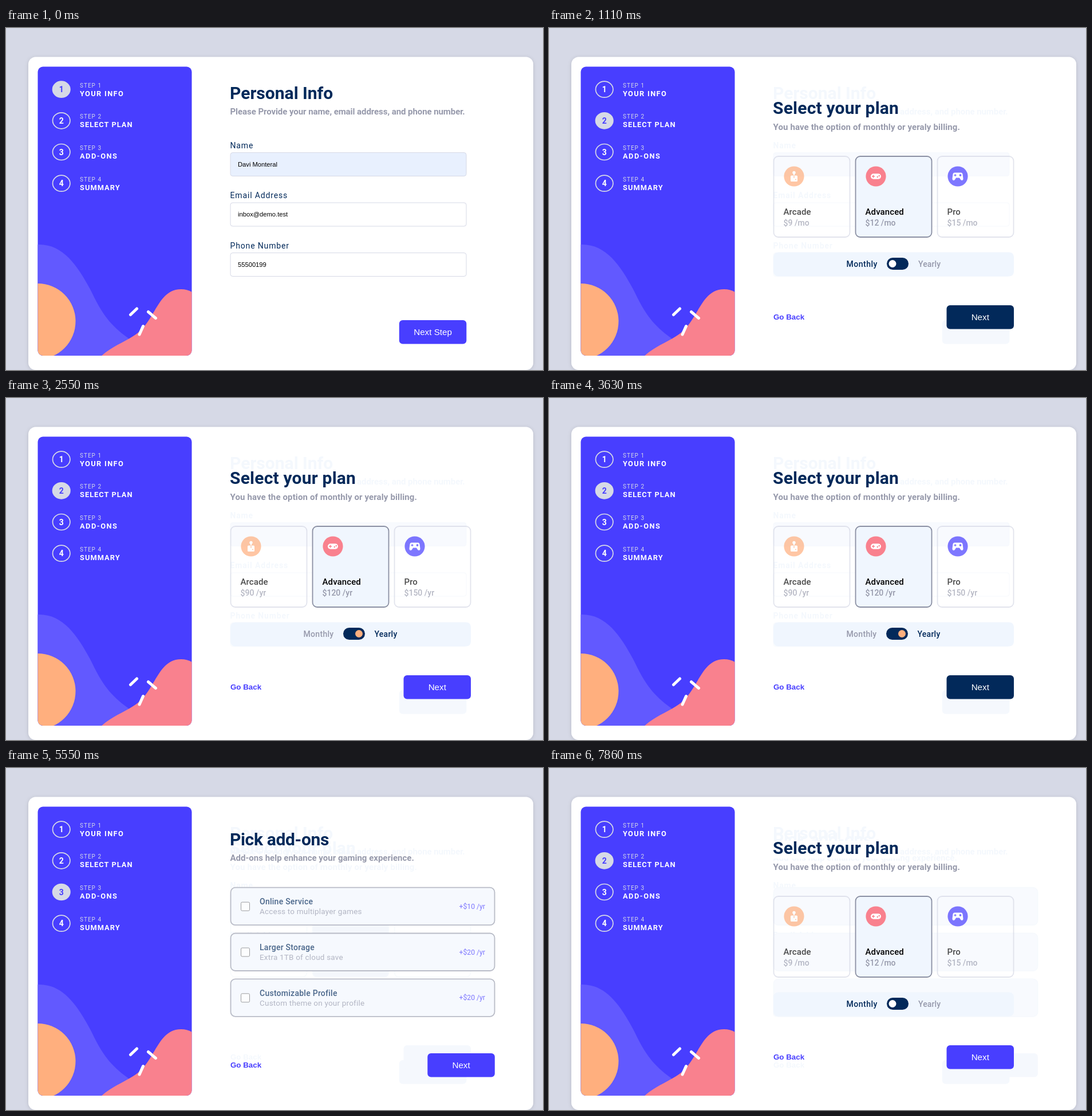
These frames come from a looping animation (938x597 px, 8 s). An HTML page:

```html
<!DOCTYPE html>
<html lang="en">
<head>
<meta charset="utf-8">
<title>Sign-up steps</title>
<style>
html, body { margin: 0; width: 100%; height: 100%; overflow: hidden; background: #d6d9e6; }
svg { display: block; width: 938px; height: 597px; }
text { font-family: Roboto, "Open Sans", sans-serif; white-space: pre; }
.title { font-size: 30px; font-weight: 700; fill: #02295a; }
.sub { font-size: 15px; font-weight: 700; fill: #9699ab; }
.label { font-size: 14px; letter-spacing: .85px; fill: #02295a; }
.input { font: 11.2px "Liberation Sans", Arial, sans-serif; fill: #000; }
.cta { font: 15.2px "Liberation Sans", Arial, sans-serif; fill: #fff; text-anchor: middle; }
.back { font: 700 13.33px "Liberation Sans", Arial, sans-serif; }
.step { font-size: 10px; letter-spacing: 1px; fill: #d6d9e6; }
.stepName { font-size: 12.8px; font-weight: 700; fill: #fff; }
.num { font-size: 14px; font-weight: 700; text-anchor: middle; }
.plan { font-size: 15px; font-weight: 500; letter-spacing: .1px; fill: #000; }
.price { font-size: 14px; font-weight: 500; fill: #9699ab; }
.period { font-size: 14px; font-weight: 500; }
.addon { font-size: 14px; font-weight: 500; letter-spacing: .25px; fill: #02295a; }
.note { font-size: 13.5px; letter-spacing: .2px; fill: #9699ab; }
.extra { font-size: 12.2px; fill: #483eff; text-anchor: end; }
/* faint remains of pages already left */
.ghost text { fill: #f4f8fd !important; font-weight: 700; }
.ghost .btn { fill: #f5f8fd; }
.ghost .tint { fill: #f8fafe; }
.ghost .picked { fill: #f4f7fc; }
.ghost [stroke] { stroke: #f6f9fd; }
.ghost .soft, .ghost .btn + text { display: none; }
</style>
</head>
<body>
<svg viewBox="0 0 938 597">
  <defs>
    <clipPath id="panel"><rect x="55.5" y="67.5" width="269" height="504.5" rx="9"/></clipPath>
    <filter id="shadow" x="-5%" y="-5%" width="110%" height="110%">
      <feDropShadow dx="0" dy="1" stdDeviation="3" flood-color="#223" flood-opacity=".14"/>
    </filter>
  </defs>
  <rect width="938" height="597" fill="#d6d9e6"/>
  <rect x="39" y="50.5" width="882" height="546.5" rx="13" fill="#fff" filter="url(#shadow)"/>
  <g clip-path="url(#panel)">
    <rect x="55" y="67" width="270" height="506" fill="#483eff"/>
    <path fill="#6259ff" d="M55 378C98 376 124 413 147 456C164 490 175 514 213 541L240 573H55Z"/>
    <circle cx="55.5" cy="512" r="66" fill="#ffaf7e"/>
    <path fill="#f9818e" d="M166 573C185 556 203 550 222 538C262 514 263 456 306 456Q316 456 325 461V573Z"/>
    <path stroke="#fff" stroke-width="5" stroke-linecap="round" d="M217.5 500.5L228.5 490M248.500 495.500L261.500 506.500M233 535L239.500 520.500"/>
  </g>
  <g id="steps"></g>
  <g id="main"></g>
</svg>
<script>
const LOOP = 8000;
const BLUE = '#483eff', NAVY = '#02295a', GREY = '#9699ab', PALE = '#d6d9e6', PEACH = '#ffaf7e';

const clamp = v => Math.max(0, Math.min(1, v));
const ramp = (t, from, to) => { const k = clamp((t - from) / (to - from)); return k * k * (3 - 2 * k); };
const lerp = (a, b, k) => a + (b - a) * k;
const channels = hex => [1, 3, 5].map(i => parseInt(hex.slice(i, i + 2), 16));
const mix = (a, b, k) => {
  const to = channels(b);
  return `rgb(${channels(a).map((v, i) => Math.round(lerp(v, to[i], k)))})`;
};

const text = (cls, x, y, str, extra = '') => `<text class="${cls}" x="${x}" y="${y}" ${extra}>${str}</text>`;
const spaced = px => `letter-spacing="${px}"`;
const rect = (x, y, w, h, r, attrs) => `<rect x="${x}" y="${y}" width="${w}" height="${h}" rx="${r}" ${attrs}/>`;
const button = (x, y, str, hover) =>
  rect(x, y, 117.5, 41.5, 6, `class="btn" fill="${mix(BLUE, NAVY, hover)}"`) +
  text('cta', x + 58.75, y + 25.5, str);
const goBack = (y, hover) => text('back', 392, y, 'Go Back', `fill="${hover ? NAVY : BLUE}"`);

function steps(active) {
  return [['YOUR INFO', 1.35], ['SELECT PLAN', 1.04], ['ADD-ONS', 1.5], ['SUMMARY', 1.06]].map(([name, gap], i) => {
    const y = 107.2 + i * 54.65, on = i + 1 === active;
    return `<ellipse cx="96.7" cy="${y}" rx="15.2" ry="14" fill="${on ? PALE : 'none'}" stroke="${PALE}" stroke-width="1.7"/>` +
      text('num', 96.7, y + 5, i + 1, `fill="${on ? BLUE : '#fff'}"`) +
      text('step', 129, y - 3.6, `STEP ${i + 1}`) +
      text('stepName', 129, y + 11.4, name, spaced(gap));
  }).join('');
}

function infoPage(s) {
  const fields = [['Name', 'Davi Monteral', '#e8f0fe'], ['Email Address', 'inbox@demo.test', '#ffffff'], ['Phone Number', '55500199', '#ffffff']];
  return text('title', 391, 124, 'Personal Info') +
    text('sub', 391.5, 151, 'Please Provide your name, email address, and phone number.', spaced(-.07)) +
    fields.map(([label, value, fill], i) => {
      const y = 217.5 + i * 87.5;
      return text('label', 391.5, y - 8, label) +
        rect(392, y, 412, 41, 4, `${i ? '' : 'class="tint"'} fill="${fill}" stroke="${PALE}"`) +
        text('input soft', 405, y + 24, value);
    }).join('') +
    button(686.8, 510, 'Next Step', s.stepHover);
}

const icons = [
  // joystick
  `<circle cy="-6.500" r="2.700" fill="#fff"/><path d="M0-5V1" stroke="#fff" stroke-width="2"/>
   <rect x="-6" y="-1.500" width="12" height="10.500" rx="1.500" fill="#fff"/>
   <path d="M0-2V3M2 5.500H4" stroke="${PEACH}" stroke-width="1.300"/>`,
  // handheld
  `<rect x="-9" y="-4.700" width="18" height="9.400" rx="4.700" fill="#fff"/>
   <path d="M-7 0H-2M-4.500-2.500V2.500" stroke="#f9818e" stroke-width="1.500"/>
   <circle cx="2.800" cy="1" r="1.200" fill="#f9818e"/><circle cx="5.800" cy="-1" r="1.200" fill="#f9818e"/>`,
  // gamepad
  `<path d="M-6-6.500H6Q8-6.500 8.500-4L9.500 4Q9.500 7 7 7Q5.500 7 3 2.500H-3Q-5.500 7-7 7Q-9.500 7-9.500 4L-8.500-4Q-8-6.500-6-6.500Z" fill="#fff"/>
   <path d="M-6.500-2H-2.500M-4.500-4V0" stroke="${BLUE}" stroke-width="1.300"/>
   <circle cx="4.500" cy="-2" r="1.900" fill="${BLUE}"/>`
];

function planPage(s) {
  const yearly = s.yearly > 0;
  const plans = [['Arcade', 9, PEACH], ['Advanced', 12, '#f9818e'], ['Pro', 15, BLUE]];
  const cards = plans.map(([name, cost, color], i) => {
    const x = 392.5 + i * 143, picked = i === 1;
    const look = picked ? `class="picked" fill="#f0f6fe" stroke="#8b90a3"` : `fill="none" stroke="${PALE}"`;
    return `<g opacity="${picked ? 1 : .7}">` +
      rect(x, 224, 133, 141, 8, `${look} stroke-width="1.8"`) +
      `<g class="soft" transform="translate(${x + 35.5} 259)"><circle r="17.6" fill="${color}"/>${icons[i]}</g>` +
      text('plan soft', x + 17, 325.5, name) +
      text('price soft', x + 17, 345, yearly ? `$${cost}0 /yr` : `$${cost} /mo`) + '</g>';
  }).join('');
  const left = yearly ? 589 : 590;
  const toggle = '<g class="soft">' + rect(392, 391.5, 420, 42, 8, 'fill="#f0f6fe"') +
    text('period', 519.5, 417, 'Monthly', `fill="${yearly ? GREY : NAVY}" ${spaced(yearly ? .3 : .5)}`) +
    text('period', yearly ? 643.5 : 645, 417, 'Yearly', `fill="${yearly ? NAVY : GREY}" ${spaced(yearly ? .25 : .1)}`) +
    rect(left, 401, 38, 21, 10.5, `fill="${NAVY}"`) +
    `<circle cx="${lerp(600, 616.5, s.yearly)}" cy="411.5" r="6.5" fill="${mix('#ffffff', PEACH, s.yearly)}"/></g>`;
  return rect(390, 127, 223, 31, 0, 'class="soft" fill="#fff"') +
    text('title', 391, 150, 'Select your plan', spaced(.2)) +
    text('sub', 391.5, 177.5, 'You have the option of monthly or yeraly billing.', spaced(.12)) +
    cards + toggle + goBack(508.8, s.planBack) + button(694.5, 484, 'Next', s.planHover);
}

function addonPage(s) {
  const rows = [
    ['Online Service', 'Access to multiplayer games', 10],
    ['Larger Storage', 'Extra 1TB of cloud save', 20],
    ['Customizable Profile', 'Custom theme on your profile', 20]
  ];
  return text('title', 391, 135, 'Pick add-ons', spaced(-.35)) +
    text('sub', 391.5, 162, 'Add-ons help enhance your gaming experience.') +
    rows.map(([name, note, cost], i) => {
      const y = 208.7 + i * 79.8, edge = i === 2 && s.boxHover ? '#4f4f4f' : '#767676';
      return rect(392.5, y, 461, 65.5, 8, 'class="tint" fill="#f6f9fe" stroke="#b9bcc7" stroke-width="1.8"') +
        '<g class="soft" opacity=".7">' +
        rect(410.5, y + 25.5, 15, 15, 2, `fill="#fff" stroke="${edge}"`) +
        text('addon', 443, y + 29.5, name) +
        text('note', 443, y + 46.2, note) +
        text('extra', 837, y + 37, `+$${cost} /yr`) + '</g>';
    }).join('') +
    goBack(523, s.addonBack) + button(736.3, 498, 'Next', s.addonHover);
}

const pages = [infoPage, planPage, addonPage];

function stateAt(t) {
  return {
    page: t < 1110 ? 0 : t < 4350 ? 1 : t < 6870 ? 2 : 1,
    left: t < 1110 ? [] : t < 4350 ? [0] : t < 6870 ? [0, 1] : [0, 2],
    stepHover: ramp(t, 370, 570),
    planHover: t < 3000 ? 1 - ramp(t, 1450, 1530) : t >= 3630 && t < 4350 ? 1 : 0,
    addonHover: t < 4470 ? 1 : 0,
    boxHover: t >= 4620 && t < 5550,
    addonBack: t >= 6600,
    planBack: t >= 6870 && t < 6960,
    yearly: ramp(t, 2385, 2550) - ramp(t, 7695, 7850)
  };
}

const stepsEl = document.getElementById('steps'), mainEl = document.getElementById('main');
const shown = new Map();
function show(el, markup) {
  if (shown.get(el) === markup) return;
  shown.set(el, markup);
  el.innerHTML = markup;
}

function draw(t) {
  const s = stateAt(t);
  show(stepsEl, steps(s.page + 1));
  show(mainEl, s.left.map(i => `<g class="ghost">${pages[i](s)}</g>`).join('') + pages[s.page](s));
}

const start = performance.now();
function tick() {
  draw((performance.now() - start) % LOOP);
  requestAnimationFrame(tick);
}
tick();
</script>
</body>
</html>
```
